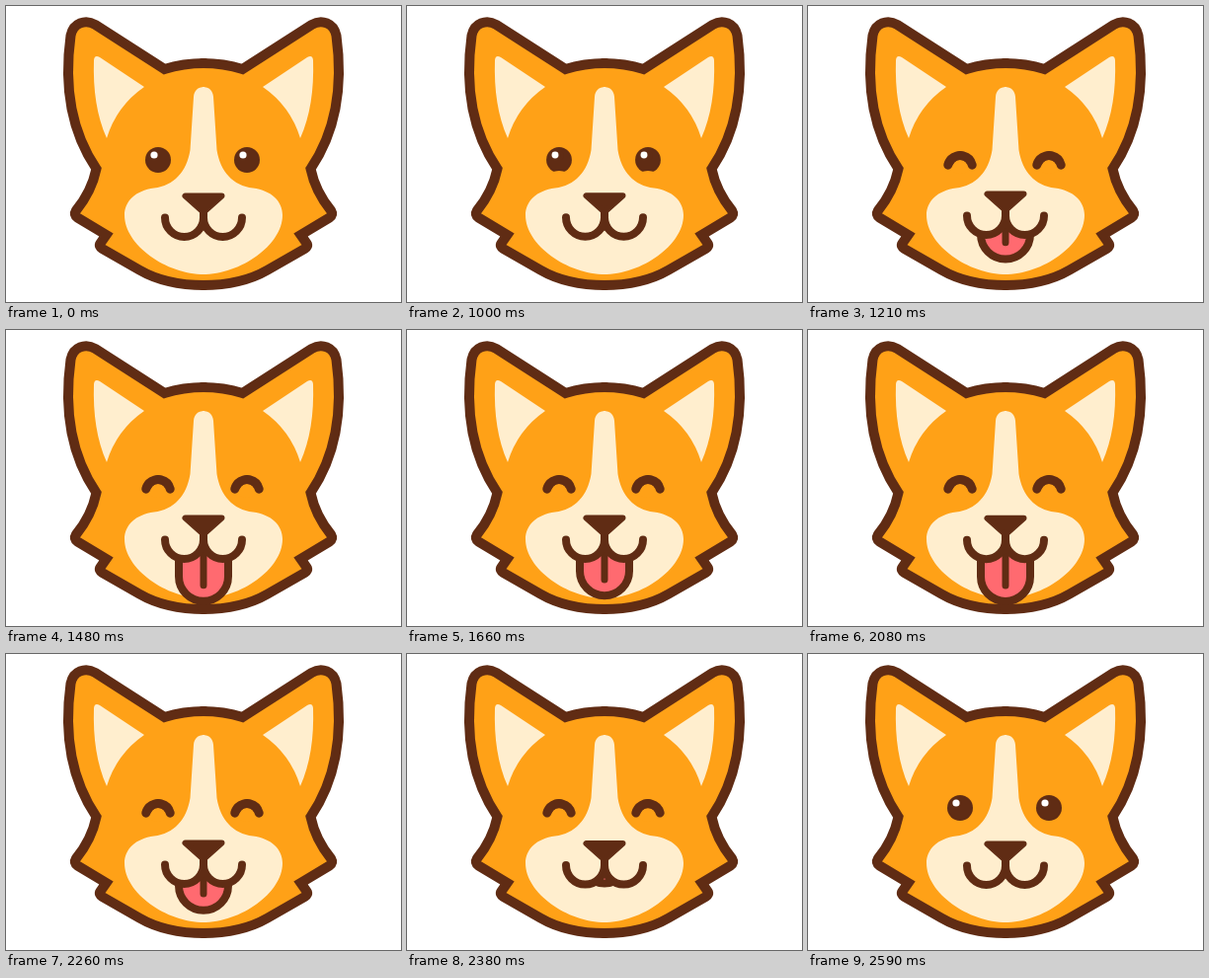
An HTML page with a canvas for the animation above (2.92 s loop, 400 by 300 pixels).

```html
<!DOCTYPE html>
<html>
<head>
<meta charset="utf-8">
<title>Happy dog</title>
<style>
  html, body { margin: 0; height: 100%; overflow: hidden; background: #fff; }
  canvas { display: block; width: 100vw; height: 100vh; }
</style>
</head>
<body>
<canvas id="stage" width="400" height="300"></canvas>
<script>
const ctx = document.getElementById('stage').getContext('2d');
const BROWN = '#602c14', ORANGE = '#ffa117', CREAM = '#ffeece', PINK = '#ff6a70';
const LOOP = 2920, PHASE = 540, OPEN = 970, PANT = 1510, CLOSE = 2050, END = 2590;
const TONGUE_TRAVEL = 60, BLINK = 210;

// Left halves; the right side is mirrored about x = 200.
const head = new Path2D(`M201 58 C186 58 173 60 160.5 64 L90.5 19 C80.5 13 68 17 65.5 30
  C60 70 61 120 91.5 165 C88 182 81 195 70.8 207.5 Q68.5 211.5 72.5 214.5 L101.5 232
  L95.5 240.5 Q93.5 243.5 97.5 246 L135 267.5 C153 278 176 283 201 283`);
const ear = new Path2D('M102 134 C92 112 88 85 89 55 Q89.5 49 95 52 L140 82 A98 98 0 0 0 102 134Z');
const muzzle = new Path2D(`M201 82 C194 82 190.5 86 190 92 L186.5 146 C183 168 170 182 150 184.5
  C131 187 120 198 120 212 C120 242 162 272 201 272`);
const nose = new Path2D('M181.5 192.5 H218.5 L200 209Z');
const lips = 'M161 214.5 a19.5 19.5 0 0 0 39 0 a19.5 19.5 0 0 0 39 0';
const mouth = new Path2D(lips + 'M200 205 V214');
const belowLips = new Path2D(lips + 'V300 H161Z');

const clamp = x => Math.min(1, Math.max(0, x));

function fill(path, color) {
  ctx.fillStyle = color;
  ctx.fill(path);
}

function stroke(path, width) {
  ctx.strokeStyle = BROWN;
  ctx.lineWidth = width;
  ctx.stroke(path);
}

function circle(x, y, r) {
  const path = new Path2D();
  path.arc(x, y, Math.max(0, r), 0, 2 * Math.PI);
  return path;
}

function bothSides(draw) {
  draw();
  ctx.save();
  ctx.translate(400, 0);
  ctx.scale(-1, 1);
  draw();
  ctx.restore();
}

function drawEye(x, shut) {
  fill(circle(x, 156, 13 - 4 * shut * shut), BROWN);
  if (shut) {
    // The cheek rises over the eye while the smiling lid spreads from its middle.
    ctx.save();
    ctx.clip(circle(x, 156, 14));
    fill(circle(x, 191 - 26.8 * shut, 22 - 13.9 * shut), ORANGE);
    ctx.restore();
    const spread = 1.33 * shut * shut;
    const lid = new Path2D();
    lid.arc(x, 164.2, 12.6, -Math.PI / 2 - spread, -Math.PI / 2 + spread);
    stroke(lid, 9);
  }
  fill(circle(x - 4, 151, 3.6 * (1 - 1.6 * shut * shut)), '#fff');
}

function drawMouth(out, lift, pant) {
  const rise = TONGUE_TRAVEL * (1 - out) + pant;
  ctx.save();
  ctx.translate(0, -2 * lift);
  if (out > 0) {
    ctx.save();
    ctx.clip(belowLips);
    const tongue = new Path2D(`M175 190 V${252 - rise} a25 25 0 0 0 50 0 V190`);
    fill(tongue, PINK);
    stroke(tongue, 8);
    stroke(new Path2D(`M200 214 V${Math.max(214, 261 - 1.05 * rise)}`), 7);
    ctx.restore();
  }
  stroke(mouth, 8);
  fill(nose, BROWN);
  stroke(nose, 6);
  ctx.restore();
}

function tongueOut(t) {
  if (t < CLOSE) return 1 - (1 - clamp((t - OPEN) / PHASE)) ** 2;
  const p = 2 * clamp((t - CLOSE) / PHASE);
  return p < 1 ? 1 - p ** 2.5 / 2 : (2 - p) ** 2.5 / 2;
}

function render(t) {
  const opening = clamp((t - OPEN) / BLINK);
  const shut = Math.min(opening, clamp((END - t) / BLINK));
  const lift = Math.min(opening, clamp(1 - (t - CLOSE) / (2 * BLINK)));
  const pant = 3 * (1 - Math.cos(4 * Math.PI * clamp((t - PANT) / PHASE)));
  ctx.fillStyle = '#fff';
  ctx.fillRect(0, 0, 400, 300);
  ctx.lineCap = 'round';
  bothSides(() => fill(head, ORANGE));
  ctx.lineJoin = 'miter';
  bothSides(() => {
    fill(ear, CREAM);
    fill(muzzle, CREAM);
    stroke(head, 10);
  });
  ctx.lineJoin = 'round';
  drawEye(154, shut);
  drawEye(244, shut);
  drawMouth(tongueOut(t), lift, pant);
}

const start = performance.now();
function tick() {
  render((performance.now() - start) % LOOP);
  requestAnimationFrame(tick);
}
tick();
</script>
</body>
</html>
```
